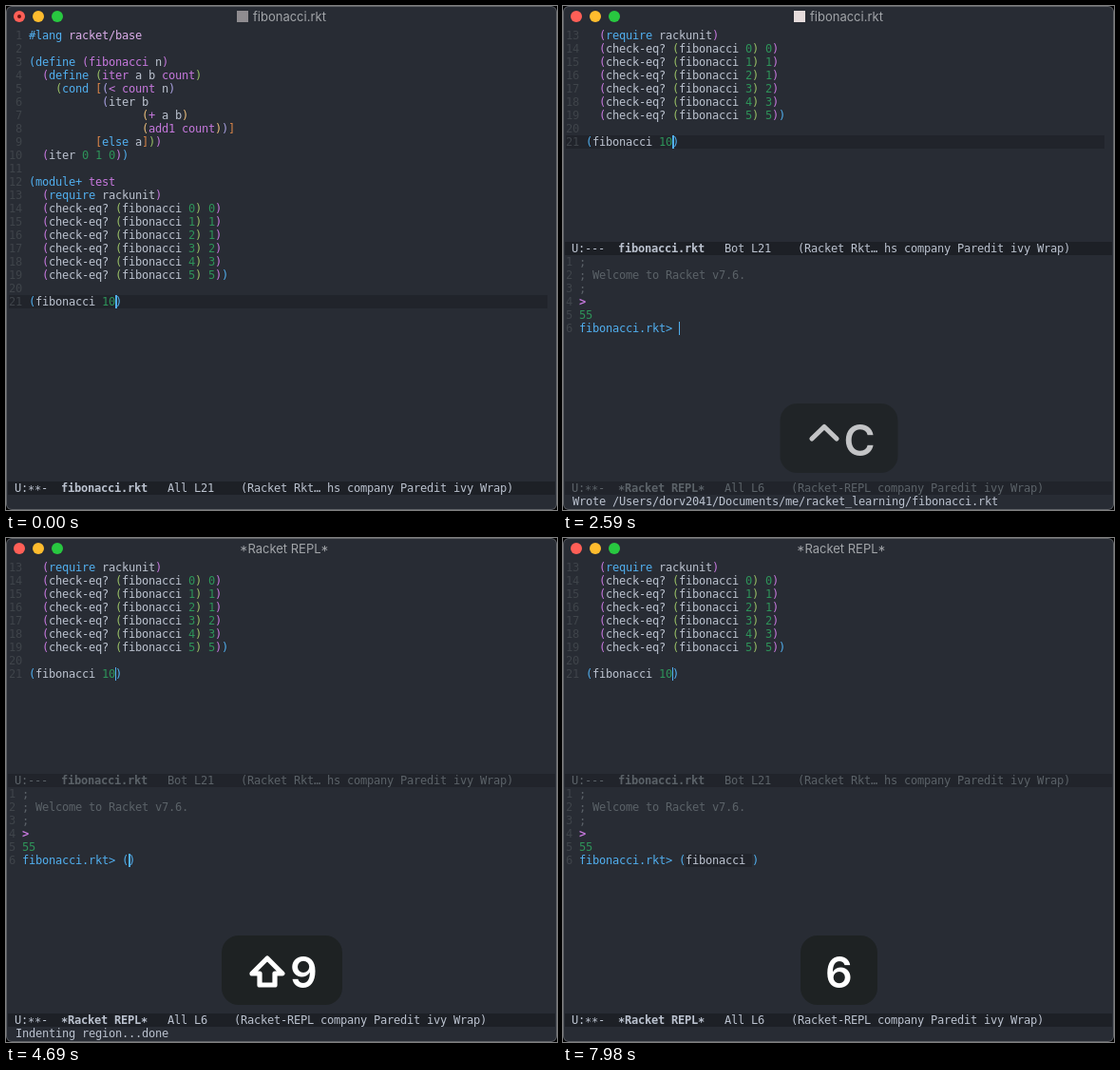
These frames come from a looping animation (580x530 px, 8000 ms). An HTML page:

```html
<!DOCTYPE html>
<html lang="en">
<head>
<meta charset="utf-8">
<title>Racket REPL</title>
<style>
html, body { margin: 0; width: 100%; height: 100%; overflow: hidden; background: #000; }
#win { position: absolute; left: 0; top: 0; width: 580px; height: 530px; box-sizing: border-box;
  background: #282c34; border-radius: 6px; overflow: hidden; color: #bbc2cf;
  font: 12px/14px "DejaVu Sans Mono", monospace; }
#win::after { content: ""; position: absolute; inset: 0; border: 1px solid #5d6065; border-radius: 6px; }
#win div { position: absolute; white-space: pre; }
.row, .mode, #echo { height: 14px; letter-spacing: calc(7px - 1ch); }
.light { width: 12px; height: 12px; top: 5px; border-radius: 50%; }
#dot { left: 4px; top: 4px; width: 4px; height: 4px; border-radius: 50%; background: #6b1510; }
#title { top: 3px; font: 13px/16px Inter, sans-serif; color: #a2a5a9; }
#icon { left: 243px; top: 5px; width: 12px; height: 12px; }
.pane { left: 0; width: 580px; overflow: hidden; }
.band { left: 3px; width: 567px; height: 14px; background: #21242b; }
.mode { left: 2px; width: 576px; background: #1d2026; }
.mode.idle { background: #21242b; color: #5b6268; }
.mode i { font-style: normal; position: relative; top: 2px; }
#echo { left: 10px; top: 514px; }
.cursor { height: 14px; background: #51afef; }
svg { position: absolute; left: 0; top: 0; }
</style>
</head>
<body>
<div id="win">
  <div class="light" style="left:8px;background:#ff5f57"><div id="dot"></div></div>
  <div class="light" style="left:28px;background:#febc2e"></div>
  <div class="light" style="left:48px;background:#28c840"></div>
  <div id="icon"></div>
  <div id="title"></div>
  <div id="code" class="pane" style="top:24px"></div>
  <div id="repl" class="pane" style="top:262px;height:238px"></div>
  <div id="mode1" class="mode" style="top:248px"></div>
  <div id="mode2" class="mode" style="top:500px"></div>
  <div id="echo"></div>
  <svg id="bezel" width="580" height="530"></svg>
</div>
<script>
const LOOP = 8000, BLINK = 500, LINGER = 1000, FADE = 220;
const C = { blue: '#51afef', magenta: '#c678dd', green: '#2e9359', pale: '#dcaeea',
  gray: '#5b6268', number: '#3f444a', dark: '#21242b' };
const RAINBOW = [C.blue, C.magenta, '#98be65', '#da8548', '#a9a1e1', '#ecbe7b'];
const KEYWORDS = ['#lang', 'define', 'cond', 'else', 'module+', 'require'];
const BUILTINS = ['<', '+', 'add1', 'count'];
const checks = [0, 1, 1, 2, 3, 5].map((v, i) =>
  `  (check-eq? (fibonacci ${i}) ${v})${i === 5 ? ')' : ''}`).join('\n');
const SOURCE = `#lang racket/base

(define (fibonacci n)
  (define (iter a b count)
    (cond [(< count n)
           (iter b
                 (+ a b)
                 (add1 count))]
          [else a]))
  (iter 0 1 0))

(module+ test
  (require rackunit)
${checks}

(fibonacci 10)`;

const $ = id => document.getElementById(id);

function add(parent, text, style = {}, tag = 'span', cls = '') {
  const el = document.createElement(tag);
  el.textContent = text;
  el.className = cls;
  Object.assign(el.style, style);
  parent.append(el);
  return el;
}
const box = (parent, cls, style) => add(parent, '', style, 'div', cls);
const row = (parent, x, n) => box(parent, 'row', { left: x + 'px', top: n * 14 + 'px' });
const cursor = (parent, x, n, width) =>
  box(parent, 'cursor', { left: x + 'px', top: n * 14 + 'px', width: width + 'px' });

function highlight(source) {
  let depth = 0;
  return source.split('\n').map(line => {
    let before = '';
    return (line.match(/[()[\]]|\s+|[^\s()[\]]+/g) || []).map(text => {
      let color = '';
      if ('(['.includes(text)) color = RAINBOW[depth++];
      else if (')]'.includes(text)) color = RAINBOW[--depth];
      else if (KEYWORDS.includes(text)) color = C.blue;
      else if (BUILTINS.includes(text) || /(\(define \(|module\+ )$/.test(before)) color = C.magenta;
      else if (text === 'racket/base') color = C.pale;
      else if (/^\d+$/.test(text)) color = C.green;
      before += text;
      return { text, color };
    });
  });
}
const program = highlight(SOURCE);

function drawCode(s, lit) {
  const pane = $('code'), first = s.split ? 12 : 0, active = !s.inRepl;
  pane.replaceChildren();
  pane.style.height = (s.split ? 224 : 476) + 'px';
  if (active) box(pane, 'band', { top: (20 - first) * 14 + 'px' });
  program.slice(first).forEach((tokens, i) => {
    add(row(pane, 3, i), String(first + i + 1).padStart(2), { color: C.number });
    const line = row(pane, 24, i);
    tokens.forEach(t => add(line, t.text, { color: t.color }));
  });
  if (!active || lit) cursor(pane, 115, 20 - first, active ? 2 : 1);
}

function drawRepl(s, lit) {
  const pane = $('repl');
  pane.replaceChildren();
  pane.style.display = s.split ? '' : 'none';
  const lines = [[';', C.gray], ['; Welcome to Racket v7.6.', C.gray], [';', C.gray],
    ['>', C.magenta], ['55', C.green], ['fibonacci.rkt> ', C.blue]].slice(0, s.lines);
  lines.forEach(([text, color], i) => {
    add(row(pane, 3, i), i + 1, { color: C.number });
    add(row(pane, 17, i), text, { color, fontWeight: text === '>' ? 'bold' : '' });
  });
  if (s.lines < 6) return;
  if (s.input !== null) {
    const line = row(pane, 122, 5);
    add(line, '(', { color: C.blue });
    add(line, s.input, { background: C.dark });
    add(line, s.preview, { color: C.blue, background: C.dark });
    add(line, ')', { color: C.blue });
  }
  const column = s.input === null ? 0 : s.input.length + 1;
  if (!s.inRepl || lit) cursor(pane, 122 + column * 7, 5, s.inRepl ? 2 : 1);
}

function drawMode(el, flags, name, place, modes, active) {
  el.replaceChildren();
  el.classList.toggle('idle', !active);
  const put = (text, style) => text.split(/(\*)/).forEach(part =>
    add(el, part, style, part === '*' ? 'i' : 'span'));
  put(` U:${flags}  `);
  put(name, { fontWeight: 'bold' });
  put(`   ${place}    (${modes} Paredit ivy Wrap)`);
}

function drawFrame(s) {
  const file = ['fibonacci.rkt', 'Racket Rkt… hs company'];
  $('title').textContent = s.inRepl ? '*Racket REPL*' : file[0];
  $('title').style.left = s.inRepl ? '246px' : '260px';
  $('icon').style.display = s.inRepl ? 'none' : '';
  $('icon').style.background = s.saved ? '#e6dcdc' : '#8f8c90';
  $('dot').style.display = s.saved ? 'none' : '';
  $('mode1').style.display = s.split ? '' : 'none';
  if (s.split) {
    drawMode($('mode1'), '---', file[0], 'Bot L21', file[1], !s.inRepl);
    drawMode($('mode2'), '**-', '*Racket REPL*', 'All L' + s.lines,
      'Racket-REPL company' + (s.capf ? '-capf' : ''), s.inRepl);
  } else {
    drawMode($('mode2'), '**-', file[0], 'All L21', file[1], true);
  }
  $('echo').textContent = s.echo;
}

// Symbols without a letter form: advance and outline around x = 0.
const SYMBOLS = {
  '^': [43, 'M-13 455L0 442.5L13 455'],
  '⇧': [46, 'M0 442L16 458H8V470H-8V458H-16Z'],
  '↩': [46, 'M-7 449L-17 458L-7 467M-16 458H10Q17 458 17 451V445'],
  '␣': [43, 'M-18 468V477H18V468']
};
const ADVANCE = { I: 14, F: 28, O: 36 };

function drawBezel(keys) {
  const advance = k => SYMBOLS[k] ? SYMBOLS[k][0] : ADVANCE[k] || 31;
  const list = [...keys];
  const width = list.reduce((sum, k) => sum + advance(k), 50);
  let x = 290.5 - width / 2, svg = `<rect x="${x}" y="418" width="${width}" height="73" rx="18" fill="#1e2223"/>`;
  x += 25;
  for (const k of list) {
    const mid = x + advance(k) / 2;
    svg += SYMBOLS[k]
      ? `<path transform="translate(${mid} 0)" d="${SYMBOLS[k][1]}" fill="none" stroke="#fff"
          stroke-width="5.2" stroke-linecap="round" stroke-linejoin="round"/>`
      : `<text x="${mid}" y="472.5" text-anchor="middle" fill="#fff" font-size="45"
          font-weight="600" font-family="Inter, sans-serif">${k}</text>`;
    x += advance(k);
  }
  $('bezel').innerHTML = svg;
}

// Each step: time, changed state, and whether a key reached the editor.
const WROTE = 'Wrote /Users/dorv2041/Documents/me/racket_learning/fibonacci.rkt';
const STEPS = [
  [-200, { split: false, saved: false, inRepl: false, lines: 1, input: null, preview: '',
    capf: false, echo: '', keys: '' }, true],
  [1050, { keys: '^' }],
  [1260, { keys: '^C' }, true],
  [1530, { keys: '^C' }, true],
  [1610, { split: true, echo: WROTE }],
  [1750, { saved: true, lines: 4 }],
  [1890, { lines: 6 }],
  [3220, { keys: '^' }],
  [3430, { keys: '^X', echo: '' }, true],
  [3700, { keys: 'O', inRepl: true }, true],
  [4200, { keys: '⇧' }],
  [4330, { keys: '⇧9', input: '', echo: 'Indenting region...done' }, true],
  [5250, { keys: 'F', input: 'f', echo: '' }, true],
  [5380, { keys: 'I', input: 'fi' }, true],
  [5450, { keys: 'B', input: 'fib' }, true],
  [5670, { capf: true, preview: 'onacci' }],
  [6785, { keys: '↩', input: 'fibonacci', preview: '', capf: false }, true],
  [7270, { keys: '␣', input: 'fibonacci ' }, true],
  [7910, { keys: '6' }]
];

let shown = '';
function render(t) {
  const state = {};
  let typedAt = 0, keysAt = 0, index = -1;
  for (const [time, patch, typed] of STEPS) {
    if (time > t) break;
    Object.assign(state, patch);
    if (typed) typedAt = time;
    if (patch.keys) keysAt = time;
    index++;
  }
  const lit = Math.floor((t - typedAt) / BLINK) % 2 === 0;
  const stamp = index + '/' + lit;
  if (stamp !== shown) {
    shown = stamp;
    drawFrame(state);
    drawCode(state, lit);
    drawRepl(state, lit);
    drawBezel(state.keys);
  }
  const fade = 1 - (t - keysAt - LINGER) / FADE;
  $('bezel').style.opacity = state.keys ? Math.max(0, Math.min(1, fade)) : 0;
}

const start = performance.now();
function tick() {
  render((performance.now() - start) % LOOP);
  requestAnimationFrame(tick);
}
tick();
</script>
</body>
</html>
```
